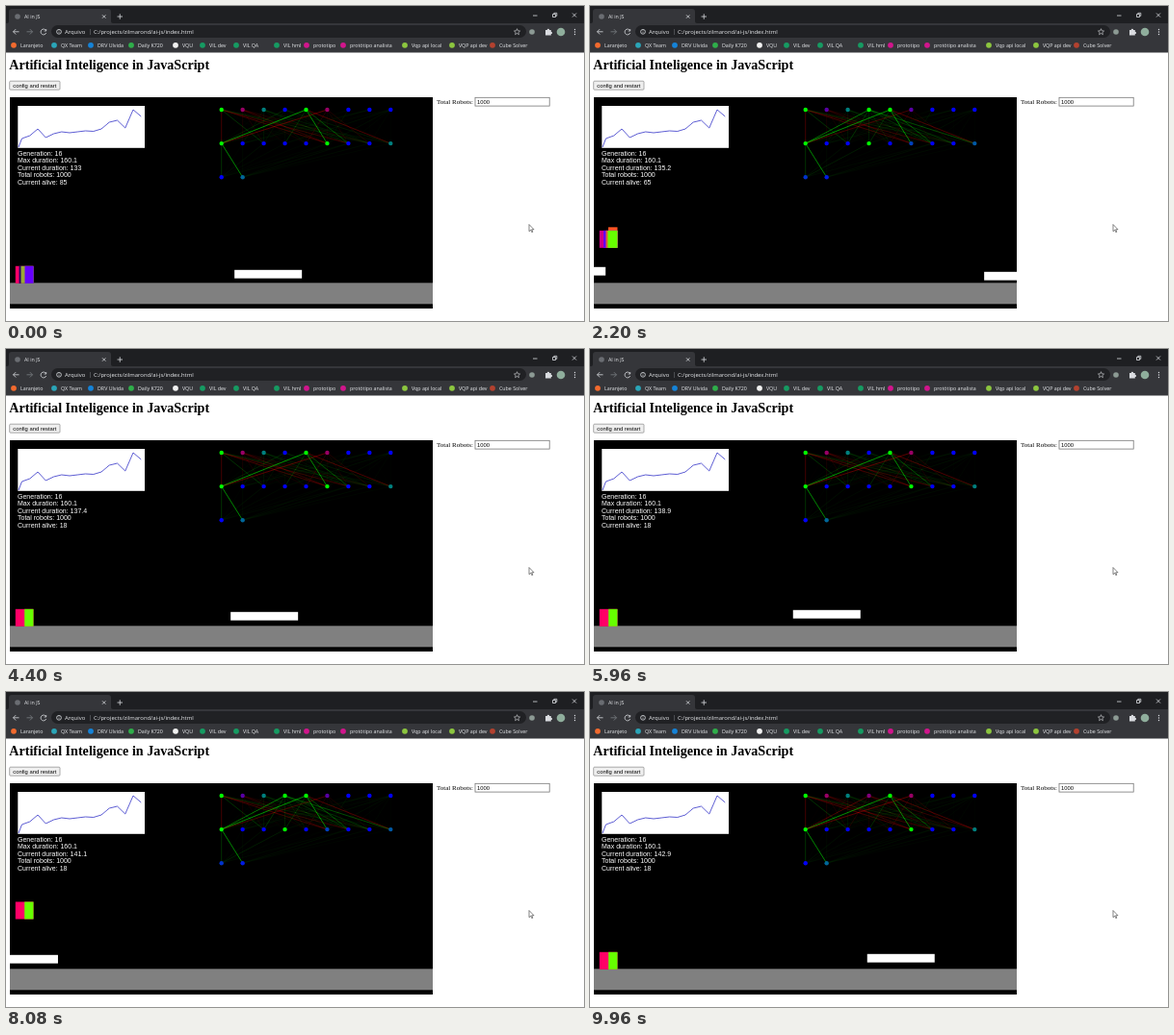
An HTML page with a canvas for the animation above (10 s loop, 600x328 px).

```html
<!DOCTYPE html>
<html lang="en">
<head>
<meta charset="utf-8">
<title>AI in JS</title>
<style>
  html, body { margin: 0; width: 100%; height: 100%; overflow: hidden; background: #fff; }
  svg, canvas { position: absolute; display: block; }
  svg { left: 0; top: 0; }
  canvas { left: 3.5px; top: 95.2px; width: 439.4px; height: 219.6px; background: #000; }
  .ui { font: 5.3px "Open Sans", "Noto Sans", sans-serif; fill: #e8eaed; }
  .url { font-size: 5.9px; }
  .arial { font: 5.85px "Liberation Sans", Arial, sans-serif; fill: #000; }
  .stats { font: 7.03px "Liberation Sans", Arial, sans-serif; fill: #fff; }
  .serif { font: 7.03px "Liberation Serif", "Times New Roman", serif; }
  .title { font-size: 14.1px; font-weight: bold; }
  .icon { fill: none; stroke: #dadce0; stroke-width: .8; }
</style>
</head>
<body>
<svg width="600" height="328" viewBox="0 0 600 328">
  <rect width="600" height="48.5" fill="#35363a"/>
  <rect width="600" height="18" fill="#1e1f22"/>
  <path d="M1 18q2 0 2-2V6q0-3 3-3h100q3 0 3 3v10q0 2 2 2z" fill="#35363a"/>
  <rect x="47" y="20" width="493" height="13" rx="6.5" fill="#202124"/>
  <circle cx="12" cy="11" r="2.8" fill="#6a6d72"/>
  <path class="icon" d="M100 9.300l3.400 3.400m0-3.400l-3.400 3.400M115.500 11h5.500m-2.750-2.750v5.500M547 10h4.500M567.500 8.500h3v3h-3zM568.800 8.500V7.300h3v3h-1.300M588 7.500l4 4m0-4l-4 4"/>
  <path class="icon" d="M13.500 26.800h-6m2.700-2.700l-2.700 2.700 2.700 2.700M41.500 25.500a2.900 2.900 0 1 0 .2 2.500m0-4v2h-2"/>
  <path class="icon" d="M21.500 26.800h6m-2.700-2.700l2.700 2.700-2.700 2.700" style="stroke:#7c7f84"/>
  <circle class="icon" cx="55" cy="26.800" r="2.400"/>
  <path class="icon" d="M55 26.500v1.600m0-2.900v.6M530.500 23.700l.9 2.100 2.200.2-1.700 1.500.5 2.200-1.900-1.200-1.900 1.200.5-2.200-1.700-1.500 2.200-.2z" style="stroke-width:.6"/>
  <circle cx="546" cy="27" r="2.800" fill="#8c9a94"/>
  <path d="M560 25h1.700a1.200 1.200 0 0 1 2.400 0h1.700v1.700a1.200 1.200 0 0 1 0 2.400v1.400H560z" fill="#dadce0"/>
  <circle cx="576" cy="27" r="4.300" fill="#8fae9c"/>
  <path class="icon" d="M590.500 24.500v6" stroke-linecap="round" stroke-dasharray="0 2.500" style="stroke-width:1.400"/>
  <g class="ui">
    <text x="19" y="13">AI in JS</text>
    <text class="url" x="61" y="29">Arquivo</text>
    <path d="M87.500 24v6" stroke="#777a7e" stroke-width=".5"/>
    <text class="url" x="91" y="29">C:/projects/zilmarond/ai-js/index.html</text>
  </g>
  <g id="marks" class="ui"></g>
  <text class="serif title" x="3.300" y="65.500">Artificial Inteligence in JavaScript</text>
  <rect x="3.700" y="78.200" width="52.300" height="9" rx="1" fill="#efefef" stroke="#767676" stroke-width=".6"/>
  <text class="arial" x="29.800" y="84.700" text-anchor="middle">config and restart</text>
  <text class="serif" x="447" y="101.800">Total Robots:</text>
  <rect x="487" y="95.300" width="77.200" height="8.800" fill="#fff" stroke="#767676" stroke-width=".8"/>
  <text class="arial" x="489" y="101.900">1000</text>
</svg>
<canvas id="game"></canvas>
<svg width="600" height="328" viewBox="0 0 600 328">
  <rect x="12.300" y="104" width="131.700" height="43.800" fill="#fff"/>
  <polyline id="chart" fill="none" stroke="#3434c8" stroke-width=".8"/>
  <g id="stats" class="stats"></g>
  <path d="M543 227.500v7.200l1.700-1.600 1.100 2.500 1-.4-1.100-2.500h2.300z" fill="#fff" stroke="#333" stroke-width=".6"/>
</svg>
<script>
const $ = id => document.getElementById(id);
const LOOP = 10, SPEED = 340, AIR = 1, PEAK = 55, RIGHT = 28;

// Bookmarks: text x, icon colour, label
$('marks').innerHTML = [
  [15, '#f26a2e', 'Laranjeto'], [57, '#2aa5b8', 'QX Team'], [95, '#1583d8', 'DRV Ulvida'],
  [137, '#2fae4a', 'Daily K720'], [183, '#f1f1f1', 'VQU'], [211, '#169b62', 'VIL dev'],
  [246, '#169b62', 'VIL QA'], [288, '#169b62', 'VIL hml'], [319, '#d1158c', 'prototipo'],
  [357, '#d1158c', 'protótipo analista'], [421, '#8cc63f', 'Vqp api local'],
  [470, '#8cc63f', 'VQP api dev'], [512, '#b3412f', 'Cube Solver']
].map(([x, c, s]) =>
  `<circle cx="${x - 7}" cy="40.800" r="2.900" fill="${c}"/><text x="${x}" y="42.700">${s}</text>`).join('');

// Best duration per generation, as heights in the chart
$('chart').setAttribute('points', '13,147 ' +
  [9, 12, 19, 10, 14, 16, 15, 16, 17, 16.5, 19, 26, 28, 20, 39, 32]
    .map((h, i) => `${16.5 + 8.25 * i},${147 - h}`).join(' '));

const lines = ['Generation: 16', 'Max duration: 160.1', '', 'Total robots: 1000', ''].map((s, i) => {
  const el = document.createElementNS('http://www.w3.org/2000/svg', 'text');
  el.setAttribute('x', 12);
  el.setAttribute('y', 155.7 + 7.5 * i);
  el.textContent = s;
  return $('stats').appendChild(el);
});

// Obstacles: distance along the track, top, and how far ahead the robots jump
const blocks = [[237, 275, 115], [694, 272, 213], [1157, 277, 56], [1729, 274, 131],
  [2237, 272, 56], [2731, 274, 191], [3674, 273, 774]]
  .map(([x, y, lead]) => ({ x, y, jump: (x - lead) / SPEED }));

// Each crowd lasts until the next; robots overlap, each reaching to RIGHT: x, colour, lift
const crowds = [
  { from: 0, alive: 85, bots: [[9.3, '#f06'], [13, '#206'], [15, '#9a3'], [19, '#60f']] },
  { from: .62, alive: 72, bots: [[18.5, '#f52', 3.5], [9.3, '#c08'], [13.5, '#60f'], [16, '#d63'], [18, '#6f0']] },
  { from: 1.96, alive: 65 },
  { from: 3.32, alive: 18, bots: [[9.3, '#f06'], [18.7, '#6f0']] }
];
crowds[2].bots = crowds[1].bots;

// Network weights: seeded and faint, with a few strong links
let seed = 7;
const rnd = () => (seed = seed * 16807 % 2147483647) / 2147483647;
const weights = (outs, strong) => Array.from({ length: 9 }, (_, a) =>
  Array.from({ length: outs }, (_, b) => strong[`${a}-${b}`] ?? rnd() ** 2 * .3));
const first = weights(9, { '0-0': -.35, '0-5': -.35, '0-6': -.3, '1-5': .4, '3-0': .6, '3-8': .4,
  '4-0': .75, '4-5': .7, '4-6': .4, '4-8': -.4, '5-0': .65 });
const second = weights(2, { '0-0': .25, '0-1': .7 });
const row = active => Array.from({ length: 9 }, (_, i) => active[i] ?? 0);

const cv = $('game'), g = cv.getContext('2d'), dpr = window.devicePixelRatio || 1;
cv.width = Math.round(439.4 * dpr);
cv.height = Math.round(219.6 * dpr);

const rect = (x, y, w, h, c) => { g.fillStyle = c; g.fillRect(x, y, w, h); };
const nodeX = i => 223.2 + 21.95 * i, nodeY = r => 108.2 + 35.1 * r;

// Neuron values, given the x of the nearest obstacle
function layers(x) {
  if (x === undefined) return [row({ 0: 1, 2: .5 }), row({ 0: 1, 2: .5, 4: .5, 6: 1 }), [.5, 0]];
  const near = x < RIGHT, dist = near ? -.35 : -.6;
  const side = near ? 1 : x > 240 ? (225 - x) / 120 : 0;
  return [
    row({ 0: 1, 1: dist, 2: .5, 3: side, 4: 1, 5: dist }),
    row(near ? { 0: 1, 3: 1, 5: .25, 8: .35 } : { 0: 1, 5: 1, 8: .5 }),
    near ? [.2, .1] : [0, .4]
  ];
}

function links(w, from, r) {
  w.forEach((ws, a) => ws.forEach((v, b) => {
    const s = Math.abs(v) * (.3 + .7 * Math.abs(from[a]));
    g.strokeStyle = v * from[a] < 0 ? `rgba(255,0,0,${s})` : `rgba(0,255,0,${s})`;
    g.beginPath();
    g.moveTo(nodeX(a), nodeY(r));
    g.lineTo(nodeX(b), nodeY(r + 1));
    g.stroke();
  }));
}

function network(x) {
  const net = layers(x);
  g.lineWidth = .75;
  links(first, net[0], 0);
  links(second, net[1], 1);
  net.forEach((vals, r) => vals.forEach((v, i) => {
    const k = Math.round(255 * Math.min(1, Math.abs(v)));
    g.fillStyle = v < 0 ? `rgb(${k},0,${255 - k})` : `rgb(0,${k},${255 - k})`;
    g.beginPath();
    g.arc(nodeX(i), nodeY(r), 2.2, 0, 7);
    g.fill();
  }));
}

function robots(t, bots) {
  const last = blocks.filter(b => b.jump <= t).pop();
  const s = last ? (t - last.jump) / AIR : 2;
  const y = 271 - (s < 1 ? 4 * PEAK * s * (1 - s) : 0);
  for (const [x, c, lift = 0] of bots) rect(x, y - lift, RIGHT - x, 18, c);
}

function draw(t) {
  g.setTransform(dpr, 0, 0, dpr, -3.5 * dpr, -95.2 * dpr);
  rect(3, 95, 441, 221, '#000');
  rect(3, 288.5, 441, 22, '#808080');
  const shift = SPEED * t;
  const seen = blocks.filter(b => b.x - shift > -67 && b.x - shift < 443);
  for (const b of seen) rect(b.x - shift, b.y, 70, 8.8, '#fff');
  const crowd = crowds.filter(c => c.from <= t).pop();
  robots(t, crowd.bots);
  network(seen.length ? seen[0].x - shift : undefined);
  lines[2].textContent = 'Current duration: ' + Math.floor((133.025 + t) * 10) / 10;
  lines[4].textContent = 'Current alive: ' + crowd.alive;
}

const t0 = performance.now();
function tick() {
  draw((performance.now() - t0) / 1000 % LOOP);
  requestAnimationFrame(tick);
}
tick();
</script>
</body>
</html>
```
